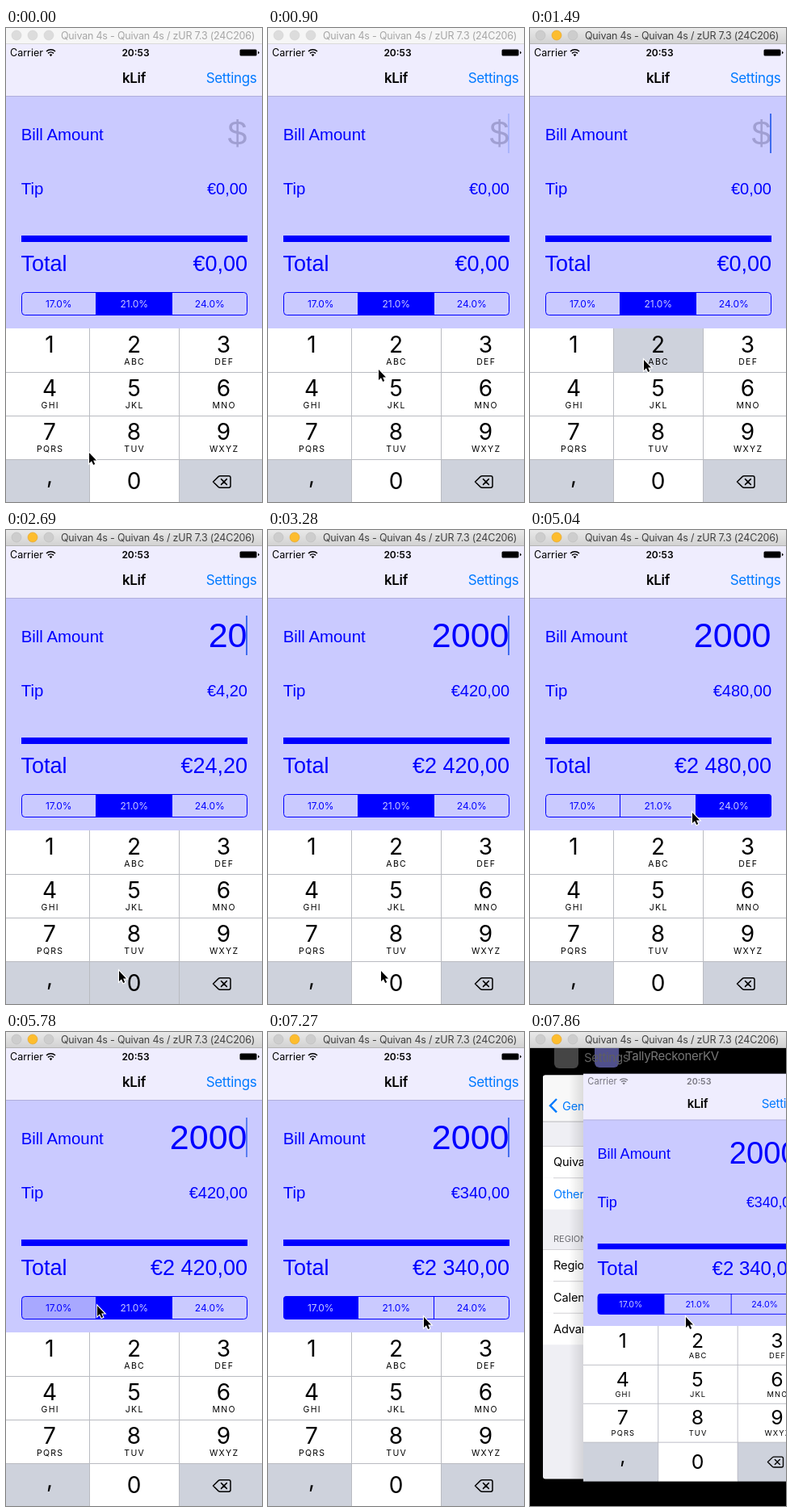
An HTML page for the animation above (8 s loop, 317 by 587 pixels).

```html
<!DOCTYPE html>
<html lang="en">
<head>
<meta charset="utf-8">
<title>Tip calculator</title>
<style>
html, body { margin: 0; width: 100%; height: 100%; overflow: hidden; background: #000; }
svg { display: block; width: 317px; height: 587px; }
text { font-family: Inter, "Open Sans", sans-serif; }
.mid { text-anchor: middle; }
.end { text-anchor: end; }
.form text { font-family: "Liberation Sans", Arial, sans-serif; fill: #00f; }
.s { font-size: 20px; }
.name { font-size: 20.4px; }
.m { font-size: 27px; }
.l { font-size: 43px; }
.form .hint { fill: #a09fd2; }
.nav { font-size: 17px; letter-spacing: -.02em; }
.link { fill: #007aff; }
.seg text { font-size: 12px; }
.digit { font-size: 28px; }
.letters { font-size: 10.5px; letter-spacing: 1.3px; }
.caption { font-size: 15px; letter-spacing: -.02em; }
.row { font-size: 14.6px; letter-spacing: -.01em; }
#title { font-size: 12.5px; letter-spacing: -.2px; }
</style>
</head>
<body>
<svg viewBox="0 0 317 587">
  <defs>
    <linearGradient id="chrome" x2="0" y2="1">
      <stop stop-color="#e9e9e9"/><stop offset="1" stop-color="#d1d1d1"/>
    </linearGradient>
    <linearGradient id="shade">
      <stop stop-opacity="0"/><stop offset="1" stop-opacity=".12"/>
    </linearGradient>
    <clipPath id="pill"><rect x="19" y="327" width="280" height="29" rx="4"/></clipPath>
  </defs>

  <g id="switcher">
    <rect y="20" width="317" height="567"/>
    <rect x="30" y="15" width="30" height="30" rx="6" fill="#454545"/>
    <rect x="80" y="14" width="30" height="30" rx="6" fill="#50508c"/>
    <text class="caption" x="67" y="36.5" fill="#5f5f5f">Settings</text>
    <text class="caption" x="118" y="35" fill="#787878">TallyReckonerKV</text>
    <rect x="16" y="53.5" width="70" height="500" rx="3" fill="#efeff4"/>
    <rect x="16" y="53.5" width="70" height="57.5" rx="3" fill="#f8f8f8"/>
    <path d="M16 111h60" stroke="#b8b8bc"/>
    <path d="M33 83l-8 8.2 8 8.2" fill="none" stroke="#007aff" stroke-width="2.4"/>
    <text class="row link" x="40" y="96.5">General</text>
    <g id="rows"></g>
    <text x="29" y="260" font-size="11" fill="#6d6d72">REGION FORMAT</text>
    <rect x="48" y="54" width="19" height="500" fill="url(#shade)"/>
  </g>

  <g id="phone">
    <rect x="-1" y="20" width="318" height="567" fill="#cacaff"/>
    <rect x="-1" y="20" width="318" height="64" fill="#efedfe"/>
    <path d="M-1 84.5h318" stroke="#b0aedb"/>
    <g id="status">
      <text x="5" y="34.5" font-size="12.5">Carrier</text>
      <text class="mid" x="160.5" y="34.5" font-size="12" font-weight="600">20:53</text>
      <path d="M50 29a8 8 0 0 1 11 0M52 31.3a5.2 5.2 0 0 1 7 0" fill="none" stroke="currentColor" stroke-width="1.6"/>
      <path d="M53.6 33.1a2.9 2.9 0 0 1 3.8 0L55.5 35.2z"/>
      <rect x="289.5" y="26.5" width="21" height="8" rx="1.5"/>
      <path d="M312 28.7v3.6q1.6-.5 1.6-1.8t-1.6-1.8z"/>
    </g>
    <text class="nav mid" x="158.5" y="68" font-weight="600">kLif</text>
    <text class="nav link end" x="310.5" y="68">Settings</text>

    <g class="form">
      <text class="name" x="18.7" y="138.5">Bill Amount</text>
      <text class="l end" x="298.5" y="145.3" id="bill"></text>
      <rect id="caret" x="297" y="106" width="2" height="49" fill="#3f6cee"/>
      <text class="name" x="18.7" y="206">Tip</text>
      <text class="s end" x="299" y="206" id="tip"></text>
      <rect x="19" y="257" width="280" height="8" fill="#00f"/>
      <text class="m" x="18.5" y="301">Total</text>
      <text class="m end" x="299" y="301" id="total"></text>
    </g>

    <g class="seg">
      <g id="segments" clip-path="url(#pill)"></g>
      <path d="M111.5 327v29M205.5 327v29" stroke="#00f"/>
      <rect x="19.5" y="327.5" width="279" height="28" rx="4" fill="none" stroke="#00f"/>
      <g id="rates"></g>
    </g>

    <g id="keys"></g>
    <path d="M-1 426.5h318M-1 480.5h318M-1 534.5h318M103.5 372v215M214.5 372v215" stroke="#b9bbc1"/>
    <g id="glyphs"></g>
    <g fill="none" stroke="#000" stroke-width="1.5" stroke-linejoin="round" stroke-linecap="round">
      <path d="M256.5 562l6.5-6.4q1-.9 2.2-.9h10.6q2.2 0 2.2 2.2v10.2q0 2.2-2.2 2.2h-10.6q-1.2 0-2.2-.9z"/>
      <path d="M266.5 558.6l6.8 6.8m0-6.8l-6.8 6.8"/>
    </g>
  </g>

  <g id="bar">
    <rect id="chromeBg" width="317" height="20"/>
    <path id="chromeLine" d="M0 19.5h317"/>
    <g id="dots"></g>
    <text id="title" x="68" y="13.8">Quivan 4s - Quivan 4s / zUR 7.3 (24C206)</text>
  </g>

  <path id="cursor" d="M1 1V14L4 11.2 6.2 16 8.2 15.1 6.1 10.5H10Z"
        stroke="#fff" stroke-width="2.2" paint-order="stroke"/>
</svg>

<script>
const LOOP = 8000;
const STEP = 148.3;
const FOCUS = 450;      // caret starts blinking
const ACTIVATE = 1190;  // window gains focus
const SWITCH = 7860;    // app switcher opens
const HOLD = 290;       // how long a tapped key stays lit
const LAG = 150;        // from touch to its effect
const RATES = [17, 21, 24];
const GREY = '#ced2dc';

const taps = [[1490, '2'], [2540, '0'], [2840, '0'], [2990, '0']];
const picks = [[4450, 2], [5190, 1], [5780, 0]];

// Pointer moves: depart, arrive, x, y
const moves = [
  [300, 1040, 140, 410],
  [1640, 2240, 139, 545],
  [3570, 4310, 249, 351],
  [4600, 5190, 150, 346],
  [5190, 5780, 105, 337],
  [6070, 6370, 192, 352]
];

const $ = id => document.getElementById(id);
const clamp = v => Math.min(1, Math.max(0, v));
const money = n => '€' + n.toFixed(2).replace('.', ',').replace(/\B(?=(\d{3})+,)/g, ' ');

function set(el, attrs) {
  for (const name in attrs) el.setAttribute(name, attrs[name]);
  return el;
}

function add(parent, tag, attrs, text = '') {
  const el = set(document.createElementNS('http://www.w3.org/2000/svg', tag), attrs);
  el.textContent = text;
  return $(parent).appendChild(el);
}

// Keypad
const edges = [-1, 103.5, 214.5, 317];
const labels = ['1', '2 ABC', '3 DEF', '4 GHI', '5 JKL', '6 MNO', '7 PQRS', '8 TUV', '9 WXYZ', ',', '0', ''];
const keys = labels.map((label, i) => {
  const col = i % 3, row = Math.floor(i / 3);
  const [digit, letters] = label.split(' ');
  const x = edges[col];
  const center = x + 55;
  const base = 402 + 54 * row + (digit === '0' ? 7 : 0);
  const fill = row === 3 && col !== 1 ? GREY : '#fff';
  const el = add('keys', 'rect', { x, y: 372 + 54.2 * row, width: edges[col + 1] - x, height: 54.5, fill });
  add('glyphs', 'text', { class: 'digit mid', x: center, y: base }, digit);
  if (letters) add('glyphs', 'text', { class: 'letters mid', x: center + .7, y: base + 15 }, letters);
  return { el, digit, fill };
});

// Tip rates
const segments = RATES.map((rate, i) => ({
  box: add('segments', 'rect', { x: 18 + 93.5 * i, y: 327, width: 94, height: 29, fill: '#00f' }),
  label: add('rates', 'text', { class: 'mid', x: 65.3 + 93.5 * i, y: 346 }, rate.toFixed(1) + '%')
}));

const dots = [13, 33, 53].map(cx => add('dots', 'circle', { cx, cy: 9, r: 6, 'stroke-width': .6 }));

// Settings list behind the app card
function addList(top, names) {
  names.forEach((name, i) => {
    const y = top + 39.4 * i;
    add('rows', 'rect', { x: 16, y, width: 70, height: 39.4, fill: '#fff' });
    add('rows', 'rect', { x: i ? 29 : 16, y, width: 60, height: .8, fill: '#c8c7cc' });
    add('rows', 'text', { class: name.startsWith('Other') ? 'row link' : 'row', x: 29, y: y + 25.3 }, name);
  });
}
addList(141, ['Quivan Language', 'Other Languages']);
addList(269, ['Region', 'Calendar', 'Advanced']);

function pointerAt(t) {
  let x = 102, y = 525;
  for (const [depart, arrive, toX, toY] of moves) {
    const p = clamp((t - depart) / (arrive - depart));
    const eased = p * p * (3 - 2 * p);
    x += (toX - x) * eased;
    y += (toY - y) * eased;
  }
  return `translate(${Math.round(x)} ${Math.round(y)})`;
}

// Blinks with soft edges, but stays solid while typing
function caretAt(t) {
  if (t < FOCUS) return 0;
  if (taps.some(([time]) => t >= time - STEP && t < time + 700)) return 1;
  const phase = (t + 710) / 1050 % 1;
  return phase < .5 ? clamp(1 - phase / .22) : clamp((phase - .5) / .1);
}

function drawWindow(active) {
  set($('chromeBg'), { fill: active ? 'url(#chrome)' : '#f6f6f6' });
  set($('chromeLine'), { stroke: active ? '#b4b4b4' : '#dadada' });
  set($('title'), { fill: active ? '#404040' : '#a6a6a6' });
  dots.forEach((dot, i) => set(dot, active
    ? i === 1 ? { fill: '#fdbd2e', stroke: '#e0a22a' } : { fill: '#cdcdcd', stroke: '#bdbdbd' }
    : { fill: '#dcdcdc', stroke: '#d2d2d2' }));
}

function drawForm(t) {
  const bill = Number(taps.filter(([time]) => t >= time + LAG).map(tap => tap[1]).join(''));
  const lit = taps.find(([time]) => t >= time && t < time + HOLD);
  const done = picks.filter(([time]) => t >= time + LAG).pop();
  const touch = picks.find(([time]) => t >= time && t < time + LAG);
  const selected = done ? done[1] : 1;
  const tip = bill * RATES[selected] / 100;

  $('bill').textContent = bill || '$';
  $('bill').classList.toggle('hint', !bill);
  $('tip').textContent = money(tip);
  $('total').textContent = money(bill + tip);

  segments.forEach(({ box, label }, i) => {
    set(box, { opacity: i === selected ? 1 : touch && touch[1] === i ? .17 : 0 });
    set(label, { fill: i === selected ? '#cacaff' : '#00f' });
  });
  for (const { el, digit, fill } of keys) {
    set(el, { fill: lit && lit[1] === digit ? GREY : fill });
  }
}

function draw(t) {
  const sampled = Math.floor(t / STEP) * STEP;
  const switching = t >= SWITCH;
  const ink = switching ? '#777680' : '#000';

  drawWindow(t >= ACTIVATE);
  drawForm(t);
  set($('caret'), { opacity: caretAt(sampled) });
  set($('cursor'), { transform: pointerAt(sampled) });
  set($('status'), { fill: ink, color: ink });
  set($('phone'), { transform: switching ? 'translate(66.9 51.8) scale(.887) translate(0 -20)' : '' });
  $('switcher').style.display = switching ? '' : 'none';
}

const start = performance.now();
function tick() {
  draw((performance.now() - start) % LOOP);
  requestAnimationFrame(tick);
}
tick();
</script>
</body>
</html>
```
